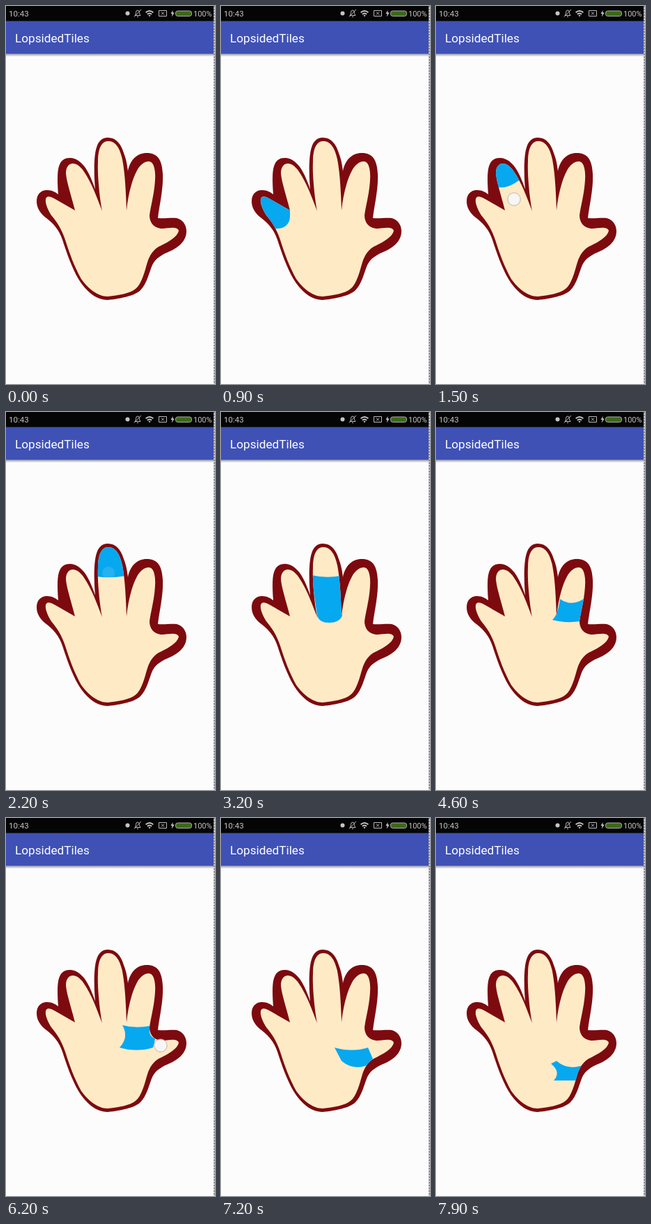
An HTML page for the animation above (8000 ms loop, 300 px wide and 540 px high).

```html
<!DOCTYPE html>
<html lang="en">
<head>
<meta charset="utf-8">
<title>Hand regions</title>
<style>
  html, body { margin: 0; width: 100%; height: 100%; overflow: hidden; background: #fcfcfc; }
  svg { display: block; width: 300px; height: 540px; }
  text { font-family: Roboto, "Noto Sans", sans-serif; }
  .region { fill: #06a8ef; visibility: hidden; }
  .region.on { visibility: visible; }
</style>
</head>
<body>
<svg viewBox="0 0 300 540">
  <defs>
    <path id="palm" d="M57 276C58 270 64 272 71 276L99 292C94 272 87 252 86 239C86 229 91 225 96 225C104 225 111 234 116 243C125 258 131 275 138 293C134 272 131 240 132 222C132 206 136 193 147 193C158 193 164 205 167 219C171 240 172 265 173 292C175 272 180 250 188 235C193 226 199 222 205 222C212 222 215 234 214 248C213 268 208 284 206 299C206 309 212 317 223 318C233 318 245 314 248 321C246 330 233 337 223 342C211 347 206 357 203 366C199 379 195 397 186 404C177 411 162 413 146 415C132 415 118 404 108 390C98 372 91 353 85 334C80 319 73 308 65 299C60 291 56 282 57 276Z"/>
    <clipPath id="inside"><use href="#palm"/></clipPath>
    <linearGradient id="shade" x2="0" y2="1">
      <stop stop-color="#000" stop-opacity=".36"/>
      <stop offset="1" stop-color="#000" stop-opacity="0"/>
    </linearGradient>
    <pattern id="edge" width="2" height="4" patternUnits="userSpaceOnUse" x="298">
      <path fill="#c6c6cc" d="M0 0h2v4H0z"/>
      <path fill="#8c8c94" d="M0 0h2v2H0z"/>
    </pattern>
  </defs>

  <path fill="#fcfcfc" d="M0 0h300v540H0z"/>
  <path fill="url(#shade)" d="M0 68.5h298v4H0z"/>
  <path fill="#3f51b5" d="M0 21h298v47.6H0z"/>
  <path fill="#050505" d="M0 0h298v21.5H0z"/>
  <path fill="url(#edge)" d="M298 0h2v540h-2z"/>

  <g fill="#c4c4c4" font-size="11">
    <text x="4" y="15" font-size="11.5">10:43</text>
    <text x="269" y="14.7">100%</text>
    <circle cx="174.5" cy="10.5" r="3"/>
    <path d="M200 8.6Q206 3.6 212 8.6L210.8 10Q206 6.2 201.2 10ZM202.2 11.1Q206 8 209.8 11.1L208.6 12.4Q206 10.4 203.4 12.4ZM204.4 13.4Q206 12.2 207.6 13.4L206 15.3Z"/>
    <path d="M239.5 6L236.5 11H238.6L237.8 15.5L241.8 9.6H239.4Z"/>
  </g>
  <g fill="none" stroke="#b8b8b8">
    <path d="M185 13.5H193Q191.5 12 191.5 9.5Q191.5 6 189 6Q186.5 6 186.5 9.5Q186.5 12 185 13.5ZM188 15.3H190M184 15.5L194 5"/>
    <path d="M219.5 6.5H230.5V14.5H219.5ZM223 8.5L227 12.5M227 8.5L223 12.5"/>
    <rect x="243.5" y="7" width="23" height="7.5" rx="3" fill="#3c6a18" stroke="#a9a9a9"/>
  </g>
  <text x="13" y="51.5" font-size="17.2" fill="#fff">LopsidedTiles</text>

  <path fill="#7d0a0f" d="M44 279C44 269 50 263 59 263C66 263 71 266 75 269C74 256 73 238 76 229C79 220 84 217 92 217C110 218 120 238 128 262C126 240 126 214 130 202C133 192 139 188 146 188C158 188 165 197 169 210C173 220 174 228 175 236C178 220 188 210 202 210C218 210 224 220 225 240C226 262 220 285 218 303C228 304 236 302 245 303C254 305 259 313 259 322C259 336 247 345 236 350C224 355 215 360 210 370C205 382 202 397 193 406C185 414 165 418 146 420C128 420 114 406 104 390C94 373 87 352 81 334C76 319 68 311 58 303C50 297 44 289 44 279Z"/>
  <use href="#palm" fill="#ffeac6"/>
  <g clip-path="url(#inside)" id="regions"></g>
  <g id="touch" opacity="0">
    <circle r="10" fill="#8a8a8a" fill-opacity=".3"/>
    <circle r="9" fill="#f8f8f8" stroke="#c9c5c0"/>
  </g>
</svg>
<script>
  const LOOP = 8000, STEP = 100;

  // at: when the region lights up; x, y: where it is tapped
  const taps = [
    { at: 600, x: 80, y: 298, d: "M50 265L75 270L99 291V300C99 312 91 318 80 318L40 320Z" },
    { at: 1200, x: 99, y: 243, d: "M80 215H125L119 249Q101 263 84 258Z" },
    { at: 1600, x: 112, y: 276, d: "M84 258Q101 263 119 249L138 290Q120 305 98 292Z" },
    { at: 2100, x: 147, y: 230, d: "M125 185H172V234Q150 238 130 235Z" },
    { at: 2900, x: 154, y: 270, d: "M130 233Q150 238 172 234L174 291Q170 301 155 301Q141 301 138 291Z" },
    { at: 3700, x: 200, y: 245, d: "M178 267Q196 280 216 264V215H180Z" },
    { at: 4300, x: 192, y: 286, d: "M178 267Q196 280 216 264L207 299Q185 302 167 297Q175 290 178 267Z" },
    { at: 5600, x: 190, y: 315, d: "M167 296Q186 301 207 297C204 308 208 313 214 315Q213 322 211 328Q188 335 163 328Q177 313 167 296Z" },
    { at: 6300, x: 222, y: 325, d: "M214 314H252V336L216 346L211 328Z" },
    { at: 7000, x: 193, y: 343, d: "M163 328Q188 335 211 328L218 344L208 354Q188 360 173 347Z" },
    { at: 7600, x: 187, y: 365, d: "M165 351L173 347Q188 360 208 354L204 375H169Q180 363 165 351Z" }
  ];

  const group = document.getElementById("regions");
  const touch = document.getElementById("touch");

  for (const tap of taps) {
    tap.el = document.createElementNS("http://www.w3.org/2000/svg", "path");
    tap.el.setAttribute("d", tap.d);
    tap.el.setAttribute("class", "region");
    group.append(tap.el);
  }

  function dotOpacity(dt) {
    if (dt < -STEP || dt > STEP) return 0;
    return dt > 0 ? 0.12 : 0.92;
  }

  function draw(now) {
    const t = Math.floor((now % LOOP) / STEP) * STEP;
    let opacity = 0;
    taps.forEach((tap, i) => {
      const end = i + 1 < taps.length ? taps[i + 1].at : LOOP;
      tap.el.classList.toggle("on", t >= tap.at && t < end);
      const o = dotOpacity(t - tap.at);
      if (o) {
        opacity = o;
        touch.setAttribute("transform", `translate(${tap.x} ${tap.y})`);
      }
    });
    touch.setAttribute("opacity", opacity);
  }

  const start = performance.now();
  function tick() {
    draw(performance.now() - start);
    requestAnimationFrame(tick);
  }
  tick();
</script>
</body>
</html>
```
